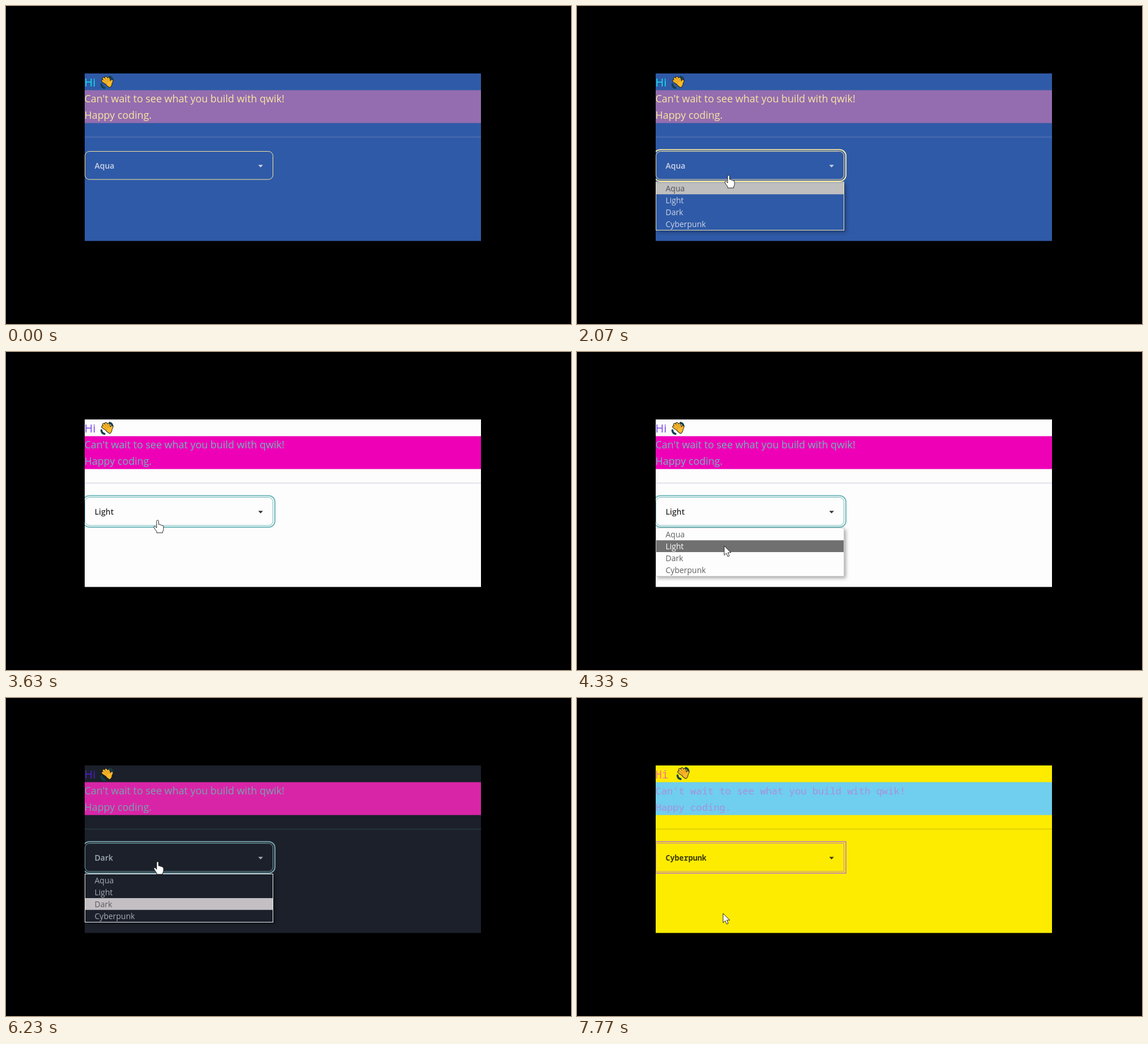
These frames come from a looping animation (998 by 561 pixels, 8000 ms). An HTML page:

```html
<!DOCTYPE html>
<html lang="en">
<head>
<meta charset="utf-8">
<title>Theme picker</title>
<style>
html, body { margin: 0; width: 100%; height: 100%; overflow: hidden; background: #000 }
#stage { display: block; width: 998px; height: 561px; --r: 8px; --ro: 11px; --ring: var(--accent);
  font: 17.9px "Open Sans", "Noto Sans", sans-serif }
.aqua { --base: #2f5aa7; --hi: #14e0ec; --band: #946db0; --accent: #f8e5a0; --rule: #4a6bb2; --text: #ccd3e8;
  --edge: #f3e6b4; --item: #ccd4e6; --mark: #bfbfbf; --marked: #50525c }
.light { --base: #fdfdfd; --hi: #7a48ea; --band: #ee00b7; --accent: #70b8bb; --rule: #e2e3ec; --text: #333;
  --ring: #37cdbe; --edge: #d0d0d0; --item: #606060; --mark: #707070; --marked: #fff }
.dark { --base: #1b202a; --hi: #4f1fc8; --band: #d825a8; --accent: #78a3ad; --rule: #25343a; --text: #a4abb8;
  --ring: #1fb2a6; --edge: #f0f0f0; --item: #a4abb8; --mark: #c3bfc3; --marked: #5c5a5e }
#stage.cyberpunk { --base: #fdec00; --hi: #fb6f8c; --band: #70ceee; --accent: #a88fe0; --rule: #e0d200; --text: #3c3800;
  --ring: #c98da0; --r: 0px; --ro: 0px; font: 17.13px "Noto Sans Mono", "DejaVu Sans Mono", monospace }
#hi { font-size: 20px; font-weight: 500; fill: var(--hi) }
.light #hi { font-weight: 400 }
.cyberpunk #hi { font-size: 19px }
.msg { fill: var(--accent) }
#value { font-size: 14px; font-weight: 600; fill: var(--text) }
.cyberpunk #value { font-size: 13.4px }
.cyberpunk #wave { transform: translate(9px, -1.5px) }
#field, #ring { fill: none; stroke: var(--ring) }
#field { rx: var(--r) }
#ring { rx: var(--ro); stroke-width: 2 }
#list { font-size: 14px; fill: var(--item) }
#box { fill: var(--base); stroke: var(--edge); filter: drop-shadow(3px 3px 3px #0005) }
#mark { fill: var(--mark) }
#list .on { fill: var(--marked) }
#cursor path { fill: #fff; stroke: #111; stroke-width: .9; stroke-linejoin: round }
</style>
</head>
<body>
<svg id="stage" class="aqua" viewBox="0 0 998 561">
  <svg x="139" y="119" width="700" height="295.5" viewBox="139 119 700 295.5">
    <path d="M139 119h700v296h-700z" fill="var(--base)"/>
    <path d="M139 148.4h700v58.2h-700z" fill="var(--band)"/>
    <path d="M139 230.3h700v2h-700z" fill="var(--rule)"/>
    <text id="hi" x="138.5" y="141.5">Hi</text>
    <g id="wave" fill="none" stroke-linecap="round" stroke-linejoin="round">
      <path d="M183 125q4.500 1 5 6M168.500 138q.5 5.500 5.500 6.500" stroke="#12414a" stroke-width="3.500"/>
      <g id="hand">
        <path id="fingers" d="M181 138.500L171 132M181 137L172.500 128M183 136L176.500 126.500M184 136L181 128M184 139L187 132M179 138.500l4 3 2-3-2-3z"/>
      </g>
      <use href="#fingers" stroke="#fbb829" stroke-width="3.300"/>
      <path d="M173.500 131.500l5 4.500M176 128.700l4.500 5M179.500 127.800l3.500 5" stroke="#9a6414" stroke-width=".6"/>
    </g>
    <text class="msg" x="138.5" y="169.700">Can't wait to see what you build with qwik!</text>
    <text class="msg" x="138.5" y="199">Happy coding.</text>
    <rect id="field" x="139.5" y="256.500" width="332" height="49.500"/>
    <rect id="ring" x="136" y="253.500" width="339" height="55.500"/>
    <text id="value" x="156.500" y="286.500"></text>
    <path d="M445.500 280.300h8.400l-4.200 4.400z" fill="var(--text)"/>
    <g id="list">
      <rect id="box" x="139.500" y="310.500" width="332" height="85"/>
      <rect id="mark" x="140" width="331" height="20.800"/>
    </g>
    <g id="cursor">
      <path id="arrow" d="M0 0V16.500l3.800-3.600 2.500 6 2.800-1.200-2.500-5.800h5.300z"/>
      <path id="point" d="M-2 1.500a1.800 1.800 0 0 1 3.600 0V7.200q2.600-.8 3.400 1 2.400-.6 3 1.100 2.200-.3 2.200 1.900v4.500q0 2.500-1.600 4.300V22H-1.800v-2.200q-2.500-3-5.200-8 0-2 2-1.600l3 3z"/>
    </g>
  </svg>
</svg>
<script>
const $ = id => document.getElementById(id);
const LOOP = 8000, ROW = 20.8, TOP = 311.4;
const names = ['Aqua', 'Light', 'Dark', 'Cyberpunk'];

// When the list opens and when an entry is picked
const opens = [1500, 3720, 5950];
const picks = [2560, 4870, 7330];

// Pointer stops: time, x, y
const stops = [
  [60, 318, 416], [700, 272, 283], [900, 270, 281], [1330, 268, 299], [2100, 268, 299],
  [2420, 262, 342], [3170, 262, 342], [3560, 268, 297], [3900, 268, 297],
  [4240, 260, 342], [4400, 260, 342], [4720, 258, 365], [5560, 258, 365],
  [5860, 268, 289], [6400, 268, 289], [6950, 258, 380], [LOOP, 258, 380]
];

const items = names.map((name, i) => {
  const label = document.createElementNS('http://www.w3.org/2000/svg', 'text');
  label.textContent = name;
  label.setAttribute('x', 156.5);
  label.setAttribute('y', 327.2 + i * ROW);
  $('list').append(label);
  return label;
});

$('hand').setAttribute('stroke', '#20211c');
$('hand').setAttribute('stroke-width', 5.2);
$('fingers').removeAttribute('stroke');

const show = (el, on) => { el.style.display = on ? '' : 'none'; };

function pointerAt(t) {
  const i = stops.findIndex(s => s[0] > t);
  if (i < 1) return [0, 450];
  const [t0, x0, y0] = stops[i - 1], [t1, x1, y1] = stops[i];
  const u = (t - t0) / (t1 - t0), k = u * u * (3 - 2 * u);
  return [x0 + (x1 - x0) * k, y0 + (y1 - y0) * k];
}

function draw() {
  const t = performance.now() % LOOP;
  const theme = picks.filter(p => t >= p).length;
  const open = opens.some((o, i) => t >= o && t < picks[i]);
  const [x, y] = pointerAt(t);
  const row = y < TOP ? theme : Math.min(3, Math.floor((y - TOP) / ROW));
  const overField = y > 256 && y < 307;

  $('stage').setAttribute('class', names[theme].toLowerCase());
  $('value').textContent = names[theme];
  show($('ring'), t >= opens[0]);
  show($('list'), open);
  $('mark').setAttribute('y', TOP + row * ROW);
  items.forEach((item, i) => item.classList.toggle('on', i === row));
  $('cursor').setAttribute('transform', `translate(${x} ${y})`);
  show($('point'), overField);
  show($('arrow'), !overField);
  requestAnimationFrame(draw);
}
draw();
</script>
</body>
</html>
```
